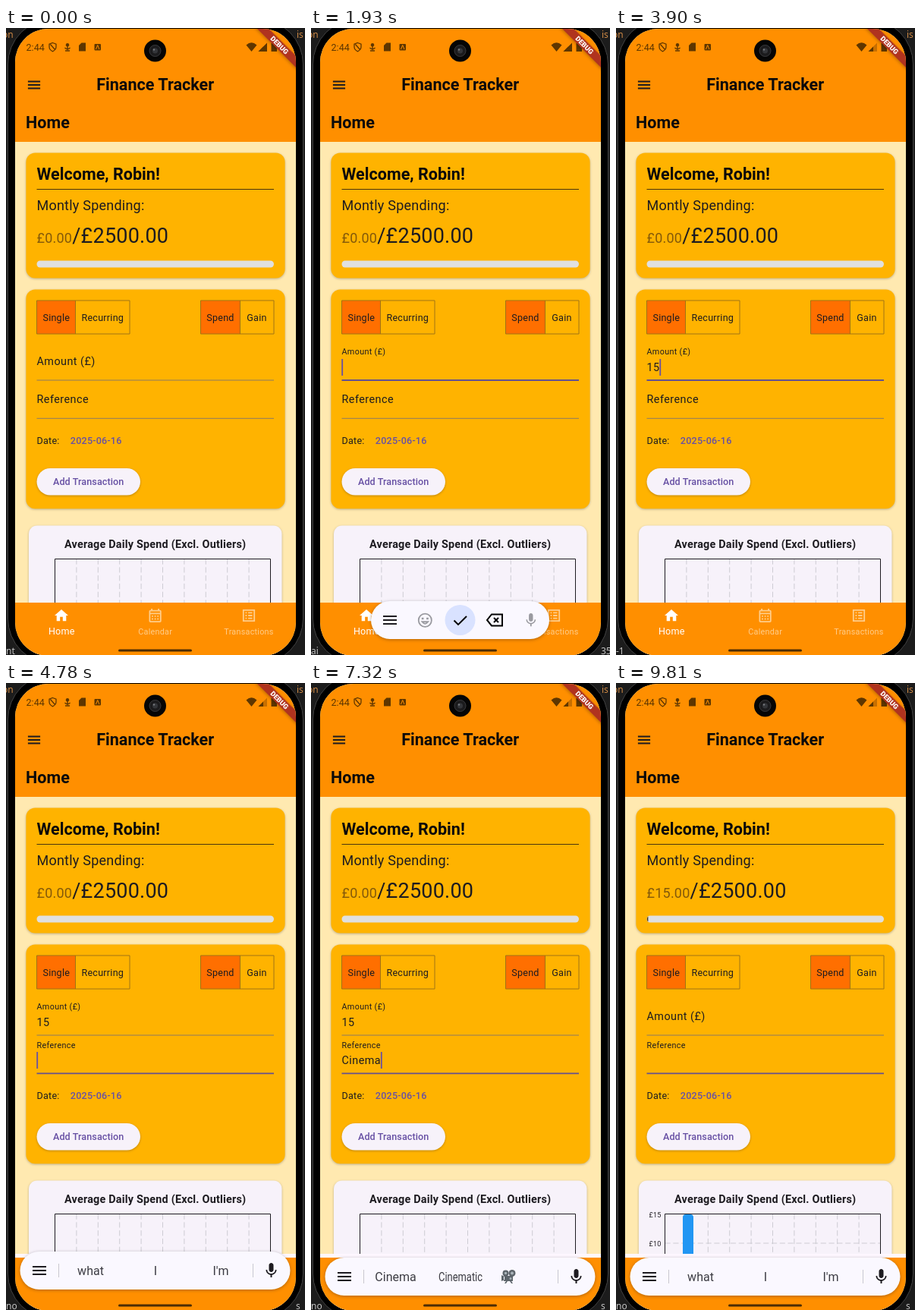
Recreate the animation shown at these times as an HTML page. Size 394 by 826 pixels, loop 9.94 s.

```html
<!DOCTYPE html>
<html lang="en">
<head>
<meta charset="utf-8">
<title>Finance Tracker</title>
<style>
html, body { margin: 0; width: 100%; height: 100%; overflow: hidden; background: #1c1c1c; }
svg { display: block; width: 394px; height: 826px; font-family: Roboto, "Noto Sans", sans-serif; fill: #1d1b20; }
.mid { text-anchor: middle; }
.title { font-size: 21.6px; font-weight: 700; fill: #0a0a0a; }
.big { font-size: 18px; letter-spacing: .225px; }
.huge { font-size: 27px; }
.field { font-size: 14.4px; letter-spacing: .45px; }
.body { font-size: 12.6px; letter-spacing: .225px; }
.medium { font-weight: 500; fill: #6750a4; }
.small { font-size: 10.8px; letter-spacing: .25px; }
.axis { font-size: 9px; letter-spacing: .225px; }
.hint { font-size: 16px; fill: #3c3c43; }
.edge { font: 12px "Noto Sans", sans-serif; fill: #c4c4c4; }
.card { filter: drop-shadow(0 1px 1.5px rgba(0,0,0,.25)); }
.bar { filter: drop-shadow(0 1px 2px rgba(0,0,0,.3)); }
.line { fill: none; stroke: currentColor; stroke-width: 2; }
.status { fill: #5e3600; color: #5e3600; }
.dim { fill: #ffcd8a; }
.box { fill: none; stroke: #a07414; }
.grid { fill: none; stroke: #c9c8cf; stroke-width: .9; stroke-dasharray: 7.2 3.6; }
</style>
</head>
<body>
<svg viewBox="0 0 394 826">
  <defs>
    <clipPath id="screen"><rect x="12" y="1" width="370" height="826" rx="44"/></clipPath>
    <path id="menu" d="M3 18h18v-2H3zM3 13h18v-2H3zM3 6v2h18V6z"/>
    <path id="mic" d="M12 14c1.66 0 3-1.34 3-3V5c0-1.66-1.34-3-3-3S9 3.34 9 5v6c0 1.66 1.34 3 3 3zm5.3-3c0 3-2.54 5.1-5.3 5.1S6.7 14 6.7 11H5c0 3.41 2.72 6.23 6 6.72V21h2v-3.28c3.28-.48 6-3.3 6-6.72z"/>
  </defs>

  <!-- desktop and phone frame -->
  <text class="edge" x="-5" y="13" style="fill:#d08a45">on</text>
  <text class="edge" x="383" y="13" style="fill:#d08a45">is</text>
  <rect x="2.5" y="-12" width="389" height="850" rx="60" fill="#000" stroke="#444"/>
  <text class="edge" id="edgeL" x="0" y="825"></text>
  <text class="edge" id="edgeR" x="382" y="825"></text>

  <g clip-path="url(#screen)">
    <rect x="12" width="370" height="826" fill="#ffe9b0"/>
    <rect x="12" width="370" height="150" fill="#ff8f00"/>

    <!-- status bar -->
    <g class="status">
      <text x="26.5" y="29.5" font-size="12.6">2:44</text>
      <path class="line" style="stroke-width:1.3" d="M61.500 19.500l4.500 1.700v3.600q0 4-4.500 6q-4.500-2-4.500-6v-3.600zM58.500 21.500l6 7"/>
      <circle cx="81" cy="22.300" r="2.200"/>
      <path class="line" style="stroke-width:1.4" d="M77.500 26q3.500 3.500 7 0M81 23v6M78 30h6"/>
      <path d="M99.500 19.500h5.500v11h-9v-7.500z"/>
      <rect x="116.500" y="21" width="8.500" height="8.500" rx="1"/>
      <path d="M118.500 28l2.200-5.500 2.200 5.500" fill="none" stroke="#ff8f00"/>
      <path d="M323.500 31l-7-8.500q7-6.500 14 0z"/>
      <path id="signal" d="M332.500 31h11.500v-11.500z"/>
      <path d="M332.500 31h6.500v-6.500z"/>
      <path d="M349.500 20h2v-1.500h3.500v1.500h2v11h-7.500z"/>
    </g>
    <circle cx="196.500" cy="30" r="14.500" fill="#050505"/>
    <circle cx="196.500" cy="30" r="7.500" fill="#1b1b1d" stroke="#39393c"/>
    <circle cx="196.500" cy="30" r="3.500" fill="#34363a"/>
    <circle cx="195" cy="28.500" r="1.200" fill="#75777b"/>

    <use href="#menu" transform="translate(26.200 64.200) scale(.9)"/>
    <text class="title mid" x="196.700" y="82.300">Finance Tracker</text>
    <text class="title" x="26" y="132.300">Home</text>

    <!-- welcome card -->
    <rect class="card" x="26.400" y="164.400" width="341.200" height="165" rx="12" fill="#ffb300"/>
    <text class="title" x="40.500" y="199.500">Welcome, Robin!</text>
    <path d="M40.500 212.500h312.500" stroke="#4a3610"/>
    <text class="big" x="40.500" y="239.500">Montly Spending:</text>
    <text class="big" x="40.500" y="282.500"><tspan id="spent" fill="#83590a"></tspan><tspan class="huge">/£2500.00</tspan></text>
    <rect x="40.500" y="306.500" width="312.500" height="9" rx="4.500" fill="#e0e0e0"/>
    <path id="progress" d="M42.400 307.500v7a4.500 4.500 0 0 1 0-7z" fill="#4b3a1c"/>

    <!-- entry card -->
    <rect class="card" x="26.400" y="344.400" width="341.200" height="288.800" rx="12" fill="#ffb300"/>
    <path d="M40.500 359h51v44h-51zM256.500 359h52v44h-52z" fill="#ff6f00"/>
    <path class="box" d="M40.500 359h122.500v44h-122.500zM91.500 359v44M256.500 359h96.500v44h-96.500zM308.500 359v44"/>
    <g class="body mid">
      <text x="66.300" y="385.500">Single</text><text x="127.300" y="385.500">Recurring</text>
      <text x="282.500" y="385.500">Spend</text><text x="330.500" y="385.500">Gain</text>
    </g>
    <path id="line1" d="M40.500 464h312.500"/>
    <path id="line2" d="M40.500 514.300h312.500"/>
    <text class="field" id="label1">Amount (£)</text>
    <text class="field" id="label2">Reference</text>
    <text class="field" id="amount" x="40.500" y="451.500"></text>
    <text class="field" id="ref" x="40.500" y="501.500"></text>
    <rect id="caret" width="1.800" height="22" fill="#6750a4"/>
    <text class="body" x="40.500" y="548.300">Date:</text>
    <text class="body medium" x="84.800" y="548.300">2025-06-16</text>
    <rect class="card" x="40.500" y="580" width="136.500" height="35.500" rx="17.750" fill="#f7f2fa"/>
    <text class="body medium mid" x="108.700" y="602.300" style="letter-spacing:.09px">Add Transaction</text>

    <!-- chart -->
    <path id="spinner" fill="none" stroke="#6750a4" stroke-width="3.600"/>
    <g id="chart">
      <rect class="card" x="30" y="655.500" width="333.500" height="190" rx="11" fill="#f7f2fa"/>
      <text class="mid" x="196.700" y="685" font-size="14.400" font-weight="700" letter-spacing=".2">Average Daily Spend (Excl. Outliers)</text>
      <path class="grid" id="grid"/>
      <g id="data">
        <path class="grid" d="M64.500 738h284"/>
        <rect id="column" x="88" width="14" height="140" rx="4" fill="#2196f3"/>
        <text class="axis" x="43.500" y="703.500">£15</text><text class="axis" x="43.500" y="741.500">£10</text>
      </g>
      <path d="M64.500 830v-130.500h284v130.500" fill="none" stroke="#1d1b20"/>
    </g>

    <!-- bottom navigation -->
    <rect id="strip" x="12" y="752" width="370" height="5" fill="#fef7ff"/>
    <rect x="12" y="757" width="370" height="70" fill="#ff8f00"/>
    <path transform="translate(62.200 763.200) scale(.9)" fill="#fff" d="M10 20v-6h4v6h5v-8h3L12 3 2 12h3v8z"/>
    <path class="dim" transform="translate(185.800 763.200) scale(.9)" fill-rule="evenodd" d="M19 4h-1V2h-2v2H8V2H6v2H5q-2 0-2 2v14q0 2 2 2h14q2 0 2-2V6q0-2-2-2zM5 10h14v10H5zM5 6h14v2H5zM7 12h2v2H7zM11 12h2v2h-2zM15 12h2v2h-2zM7 16h2v2H7zM11 16h2v2h-2zM15 16h2v2h-2z"/>
    <path class="dim" transform="translate(309.200 763.200) scale(.9)" fill-rule="evenodd" d="M3 3h18v18H3zM5 5v14h14V5zM11 7h6v2h-6zM11 11h6v2h-6zM11 15h6v2h-6zM7 7h2v2H7zM7 11h2v2H7zM7 15h2v2H7z"/>
    <text class="body mid" x="73.300" y="798.500" style="fill:#fff">Home</text>
    <text class="small mid dim" x="196.700" y="799">Calendar</text>
    <text class="small mid dim" x="320" y="799">Transactions</text>

    <!-- compact input bar -->
    <g id="compact">
      <rect class="bar" x="79" y="757" width="235" height="50" rx="25" fill="#faf8ff"/>
      <circle cx="196.500" cy="782" r="20" fill="#d9e2ff"/>
      <use href="#menu" transform="translate(92 770)"/>
      <g color="#9a9aa0" transform="translate(139.500 771.500) scale(.9)">
        <circle class="line" cx="12" cy="12" r="9.500"/>
        <path class="line" d="M7.500 14q4.500 6 9 0z"/>
        <path d="M7 8h3v3H7zM14 8h3v3h-3z" fill="#9a9aa0"/>
      </g>
      <path class="line" d="M188.500 782.500l5.500 5.500 11-11"/>
      <path class="line" transform="translate(230 770)" d="M8 4.500h14v15H8L2 12zM11 9l6 6M17 9l-6 6"/>
      <use href="#mic" transform="translate(279 771.300) scale(.9)" fill="#9a9aa0"/>
    </g>

    <!-- suggestion bar -->
    <g id="wide">
      <rect class="bar" x="18.500" y="757" width="356" height="50" rx="25" fill="#faf8ff"/>
      <use href="#menu" transform="translate(32 770)"/>
      <path d="M69.500 773v18M325.500 773v18" stroke="#c9c8cf"/>
      <text class="hint mid"></text><text class="hint mid"></text><text class="hint mid"></text>
      <g id="projector" fill="#5d656b">
        <path d="M254 781h12v7h-12zM255 782l-4-2v8l4-2zM257 788h2l-2 3h-2zM262 788h2l2 3h-2z"/>
        <circle cx="256.500" cy="777.500" r="4"/><circle cx="265" cy="777.500" r="4.500"/>
        <circle cx="256.500" cy="777.500" r="1.700" fill="#a9b3b9"/><circle cx="265" cy="777.500" r="2" fill="#a9b3b9"/>
        <circle cx="263" cy="784.500" r="1.500" fill="#a9b3b9"/>
      </g>
      <use href="#mic" transform="translate(337.500 770)"/>
    </g>
    <rect x="148" y="818.500" width="97" height="3" rx="1.500" fill="#4d2d05"/>

    <!-- corner banner -->
    <g transform="translate(382 1) rotate(45)">
      <rect class="bar" x="-60" y="25.200" width="120" height="10.800" fill="#b0331f"/>
      <text class="mid" y="33.800" font-size="9.200" font-weight="900" style="fill:#fff">DEBUG</text>
    </g>
  </g>
</svg>
<script>
const LOOP = 9940;
const $ = id => document.getElementById(id);
const hints = document.querySelectorAll(".hint");
const HINT_X = [111.5, 197, 283], HINT_MAX = 58;
const start = performance.now();

const clamp = u => Math.min(1, Math.max(0, u));
const ease = u => u < .5 ? 4 * u ** 3 : 1 - (2 - 2 * u) ** 3 / 2;
const ramp = (t, a, b) => ease(clamp((t - a) / (b - a)));
const within = (t, ...spans) => spans.some(([a, b]) => t >= a && t < b);
const show = (el, on) => el.setAttribute("visibility", on ? "visible" : "hidden");
const latest = (steps, t) => steps.reduce((v, s) => t >= s[0] ? s : v);

function track(points, t) {
  const i = points.findIndex(p => p[0] > t);
  if (i < 0) return points.at(-1)[1];
  if (i === 0) return points[0][1];
  const [a, b] = [points[i - 1], points[i]];
  return a[1] + (b[1] - a[1]) * (t - a[0]) / (b[0] - a[0]);
}

const amounts = [[0, ""], [2940, "1"], [3070, "15"], [9170, ""]];
const refs = [[0, ""], [5390, "C"], [5590, "Ci"], [5850, "Cin"], [6120, "Cine"],
  [6250, "Cinem"], [6380, "Cinema"], [9170, ""]];
const suggestions = [[0, "what", "I", "I'm"], [5460, "C", "Can", "Could"], [5660, "Ci", "City", "Civil"],
  [5920, "Cin", "Cinema", ""], [6190, "Cine", "Cinema", ""], [6310, "Cinema", "Cinematic", ""],
  [9170, "what", "I", "I'm"]];
const edges = [[0, "nt", ""], [1650, "ai", "35"], [2210, "-1", ""], [4300, "no", "s"]];
const compactY = [[1700, 69], [1790, 30], [1860, 5], [1930, -2], [2000, -6], [2070, -4], [2210, 0],
  [3620, 0], [3690, 16], [3760, 42], [3830, 69]];
const wideY = [[4470, 69], [4570, 35], [4640, 8], [4710, -4], [4780, -8], [4850, -7], [4920, -4], [5060, 0]];

let gridPath = "";
for (let i = 1; i < 10; i++) gridPath += `M${64.5 + 28.4 * i} 699.5v130`;
$("grid").setAttribute("d", gridPath);

function drawLabel(el, rest, lift, u) {
  el.setAttribute("transform", `translate(40.5 ${rest - lift * u}) scale(${1 - .25 * u})`);
}

function drawLine(el, active) {
  el.setAttribute("stroke", active ? "#64518f" : "#8b7b63");
  el.setAttribute("stroke-width", active ? 1.8 : 1);
}

function slide(el, points, t) {
  const y = track(points, t);
  el.setAttribute("transform", `translate(0 ${y})`);
  el.setAttribute("opacity", clamp((69 - y) / 45));
}

function drawFields(t) {
  const onAmount = within(t, [1580, 4230]), onRef = t >= 4230;
  drawLabel($("label1"), 444, 14, ramp(t, 1580, 1790) - ramp(t, 9170, 9380));
  drawLabel($("label2"), 494, 13.5, ramp(t, 4230, 4440));
  drawLine($("line1"), onAmount);
  drawLine($("line2"), onRef);
  $("amount").textContent = latest(amounts, t)[1];
  $("ref").textContent = latest(refs, t)[1];
  const text = onRef ? $("ref") : $("amount");
  const width = text.textContent ? text.getComputedTextLength() : 0;
  $("caret").setAttribute("x", 40.3 + width);
  $("caret").setAttribute("y", onRef ? 486 : 436);
  show($("caret"), within(t, [1650, 2610], [2940, 3620], [3900, 4230], [4300, 6860],
    [7320, 7850], [8310, 8840], [9310, 9800]));
}

function drawBars(t) {
  slide($("compact"), compactY, t);
  slide($("wide"), wideY, t);
  show($("strip"), within(t, [2000, 3760], [4700, LOOP]));
  const words = latest(suggestions, t).slice(1);
  words.forEach((word, i) => {
    const el = hints[i];
    el.textContent = word;
    const fit = word ? Math.min(1, HINT_MAX / el.getComputedTextLength()) : 1;
    el.setAttribute("transform", `translate(${HINT_X[i]} 788) scale(${fit} 1)`);
  });
  show($("projector"), !words[2]);
}

function drawChart(t) {
  const loading = within(t, [9170, 9450]), done = t >= 9450;
  show($("chart"), !loading);
  $("data").setAttribute("display", done ? "inline" : "none");
  $("column").setAttribute("y", 700 + 130 * (1 - ramp(t, 9450, 9660)));
  $("spent").textContent = done ? "£15.00" : "£0.00";
  show($("progress"), done);
  show($("spinner"), loading);
  if (!loading) return;
  const r = 14.4, turn = (t - 9170) / 1333 * Math.PI / 2;
  const a = turn - Math.PI / 2 - .12, b = a + .24 + 4.5 * ramp(t, 9170, 9840);
  const at = q => `${196.7 + r * Math.cos(q)} ${666 + r * Math.sin(q)}`;
  $("spinner").setAttribute("d", `M${at(a)}A${r} ${r} 0 ${b - a > Math.PI ? 1 : 0} 1 ${at(b)}`);
}

function frame() {
  const t = (performance.now() - start) % LOOP;
  drawFields(t);
  drawBars(t);
  drawChart(t);
  $("signal").setAttribute("opacity", t < 2940 ? 1 : .35);
  const [, left, right] = latest(edges, t);
  $("edgeL").textContent = left;
  $("edgeR").textContent = right;
  requestAnimationFrame(frame);
}
frame();
</script>
</body>
</html>
```
